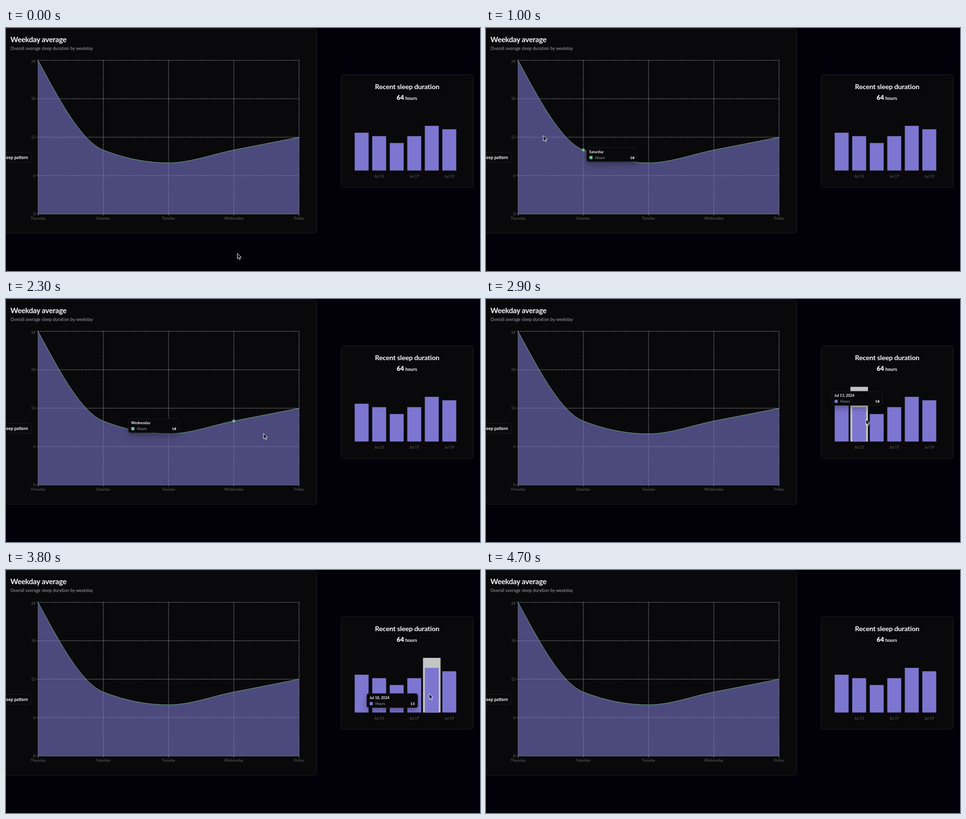
These frames come from a looping animation (968 by 497 pixels, 4.8 s). An HTML page:

```html
<!DOCTYPE html>
<html lang="en">
<head>
<meta charset="utf-8">
<title>Sleep dashboard</title>
<style>
  html, body { margin: 0; width: 100%; height: 100%; overflow: hidden; background: #020009; }
  svg { display: block; font-family: Nunito, Lato, "Open Sans", sans-serif; }
  .card { fill: #09090b; stroke: #1e1e22; }
  .title { font-weight: 700; fill: #fafafa; }
  .tick { font-size: 7.6px; fill: #666; }
  .grid { stroke: #bbb; stroke-dasharray: 1.9 1.9; }
  .axis { stroke: #666; }
  #tip { filter: drop-shadow(0 6px 6px rgba(0, 0, 0, .28)); font-size: 7.5px; }
  #hours { font-family: "Noto Sans Mono", "DejaVu Sans Mono", monospace; font-weight: 600; fill: #fafafa; }
</style>
</head>
<body>
<svg width="968" height="497" viewBox="0 0 968 497">
  <rect class="card" x="-20" y="1.5" width="654.5" height="418.5" rx="5"/>
  <text class="title" x="9" y="29" font-size="15.1" letter-spacing="-.25">Weekday average</text>
  <text x="9" y="44.5" font-size="8.8" letter-spacing=".1" fill="#a1a1aa">Overall average sleep duration by weekday</text>
  <g id="axes"></g>
  <path id="area" fill="#7876c8" fill-opacity=".6"/>
  <path id="curve" fill="none" stroke="#82ca9d" stroke-width=".8"/>
  <circle id="dot" r="2.9" fill="#72bd90"/>
  <rect class="card" x="-30" y="254.5" width="82" height="20" rx="3.5"/>
  <text class="title" x="44.8" y="267.5" font-size="8.7" text-anchor="end">Sleep pattern</text>

  <rect class="card" x="684.5" y="95.5" width="270" height="230.5" rx="5"/>
  <text class="title" x="819.3" y="125" font-size="14" letter-spacing="-.18" text-anchor="middle">Recent sleep duration</text>
  <text class="title" x="797.8" y="147.3" font-size="13" style="font-weight: 900">64</text>
  <text class="title" x="815.5" y="147" font-size="9.5">hours</text>
  <rect id="band" y="179.7" width="35.8" height="111.8" fill="#c5c5c5"/>
  <g id="bars" fill="#7d76d0"></g>

  <g id="tip">
    <rect x=".5" y=".5" width="104" height="28.6" rx="4" fill="#09090b" stroke="#1c1c20"/>
    <text id="name" class="title" x="6" y="11.7"></text>
    <rect id="swatch" x="6.3" y="17.8" width="6.4" height="6.4" rx="1"/>
    <text x="17.8" y="23.8" fill="#a1a1aa">Hours</text>
    <text id="hours" x="98.3" y="23.8" text-anchor="end"></text>
  </g>
  <path id="cursor" d="M0 0V11L2.5 8.8 4.2 12.6 6.1 11.8 4.5 8H7.9Z" fill="#000" stroke="#fff"/>
</svg>
<script>
const LOOP = 4800, STEP = 100, LAG = 80, FOLLOW = .25;
const TIP_WIDTH = 105, TIP_GAP = 8;
const $ = id => document.getElementById(id);

const week = {
  left: 65.5, right: 598.5, top: 66, bottom: 380.5, corner: [10, 66], color: "#72bd90",
  data: [["Thursday", 24], ["Saturday", 10], ["Tuesday", 8], ["Wednesday", 10], ["Friday", 12]],
  x: i => 65.5 + i * 133.25,
  index: x => Math.round((x - 65.5) / 133.25)
};
const recent = {
  left: 708.4, right: 923.2, top: 179.7, bottom: 291.5, corner: [684, 165], color: "#7d76d0",
  data: [[12, 11], [13, 10], [15, 8], [17, 10], [18, 13], [19, 12]].map(([d, h]) => ["Jul " + d, h]),
  x: i => 726.3 + i * 35.8,
  index: x => Math.floor((x - 708.4) / 35.8)
};
const hourY = h => week.bottom - h * 13.1;

// Pointer stops: [time, x, y]
const stops = [
  [0, 472.5, 461], [700, 225, 262], [1000, 117, 220], [1300, 82, 188], [1600, 98, 164],
  [1850, 20, 262], [2300, 526, 275], [2700, 684, 262], [2900, 776, 246],
  [3800, 864, 253], [4200, 912, 262], [4400, 896, 376]
];

// Monotone cubic through points; column 0 is the parameter, column d the value.
function slope(points, i, d) {
  const secant = j => (points[j + 1][d] - points[j][d]) / (points[j + 1][0] - points[j][0]);
  const last = points.length - 1;
  if (i === 0) return (3 * secant(0) - slope(points, 1, d)) / 2;
  if (i === last) return (3 * secant(last - 1) - slope(points, last - 1, d)) / 2;
  const a = secant(i - 1), b = secant(i);
  if (a * b <= 0) return 0;
  return 2 * Math.sign(a) * Math.min(Math.abs(a), Math.abs(b), Math.abs(a + b) / 4);
}
function monotone(points, t, d) {
  t = Math.min(Math.max(t, 0), points.at(-1)[0]);
  const i = Math.min(points.findLastIndex(p => p[0] <= t), points.length - 2);
  const p = points[i], q = points[i + 1], span = q[0] - p[0], u = (t - p[0]) / span;
  return p[d] + (q[d] - p[d]) * u * u * (3 - 2 * u)
    + span * u * (1 - u) * ((1 - u) * slope(points, i, d) - u * slope(points, i + 1, d));
}
const pointer = t => [monotone(stops, t, 1), monotone(stops, t, 2)];

const line = (cls, x1, y1, x2, y2) =>
  `<line class="${cls}" x1="${x1}" y1="${y1}" x2="${x2}" y2="${y2}"/>`;
const tick = (x, y, anchor, text) =>
  `<text class="tick" x="${x}" y="${y}" text-anchor="${anchor}">${text}</text>`;

function build() {
  const { left, right, top, bottom } = week;
  let axes = "";
  for (let h = 0; h <= 24; h += 6) {
    const y = hourY(h);
    axes += line("grid", left, y, right, y) + line("axis", left - 3.8, y, left, y)
      + tick(60, Math.max(y + 2.7, 70.5), "end", h);
  }
  week.data.forEach(([day], i) => {
    const x = week.x(i);
    axes += line("grid", x, top, x, bottom) + line("axis", x, bottom, x, bottom + 3.8)
      + tick(x, 391.5, "middle", day);
  });
  $("axes").innerHTML = axes + line("axis", left, top, left, bottom) + line("axis", left, bottom, right, bottom);

  const points = week.data.map(([, h], i) => [week.x(i), hourY(h)]);
  const path = [];
  for (let x = left; x <= right; x += 3.25) path.push([x, monotone(points, x, 1).toFixed(2)]);
  const curve = "M" + path.join("L");
  $("curve").setAttribute("d", curve);
  $("area").setAttribute("d", `${curve}V${bottom}H${left}Z`);

  $("bars").innerHTML = recent.data.map(([date, h], i) => {
    const x = recent.x(i), height = h * 7.03;
    return `<rect x="${x - 14.2}" y="${recent.bottom - height}" width="28.4" height="${height}"/>`
      + (i % 2 ? tick(x, 306.3, "middle", date) : "");
  }).join("");
}

// Chart and item under the pointer, which the page notices slightly late
function hover(t) {
  const [x, y] = pointer(t - LAG);
  const chart = [week, recent].find(c => x >= c.left && x <= c.right && y >= c.top && y <= c.bottom);
  return chart && { chart, y, i: chart.index(x) };
}

// The tooltip glides toward the item, flipping sides near the right edge
function tipAt(t, chart) {
  let [x, y] = chart.corner;
  for (let s = 0; s <= t; s += STEP) {
    const hit = hover(s);
    if (hit?.chart !== chart) continue;
    const item = chart.x(hit.i), reach = TIP_GAP + TIP_WIDTH;
    const goal = item + (item + reach > chart.right ? -reach : TIP_GAP);
    x += (goal - x) * FOLLOW;
    y += (hit.y + TIP_GAP - y) * FOLLOW;
  }
  return [x, y];
}

const move = (id, pos) => $(id).setAttribute("transform", `translate(${pos})`);
const show = (id, on) => { $(id).style.display = on ? "" : "none"; };

function draw(now) {
  const t = Math.floor(now % LOOP / STEP) * STEP;
  const onStage = t <= stops.at(-1)[0];
  const hit = onStage && hover(t);
  show("cursor", onStage);
  move("cursor", pointer(t));
  show("tip", hit);
  show("dot", hit?.chart === week);
  show("band", hit?.chart === recent);
  if (hit) {
    const { chart, i } = hit;
    const [label, hours] = chart.data[i];
    move("tip", tipAt(t, chart));
    $("name").textContent = chart === week ? label : label + ", 2024";
    $("hours").textContent = hours;
    $("swatch").setAttribute("fill", chart.color);
    if (chart === week) move("dot", [chart.x(i), hourY(hours)]);
    else move("band", [chart.x(i) - 17.9, 0]);
  }
  requestAnimationFrame(draw);
}
build();
requestAnimationFrame(draw);
</script>
</body>
</html>
```
